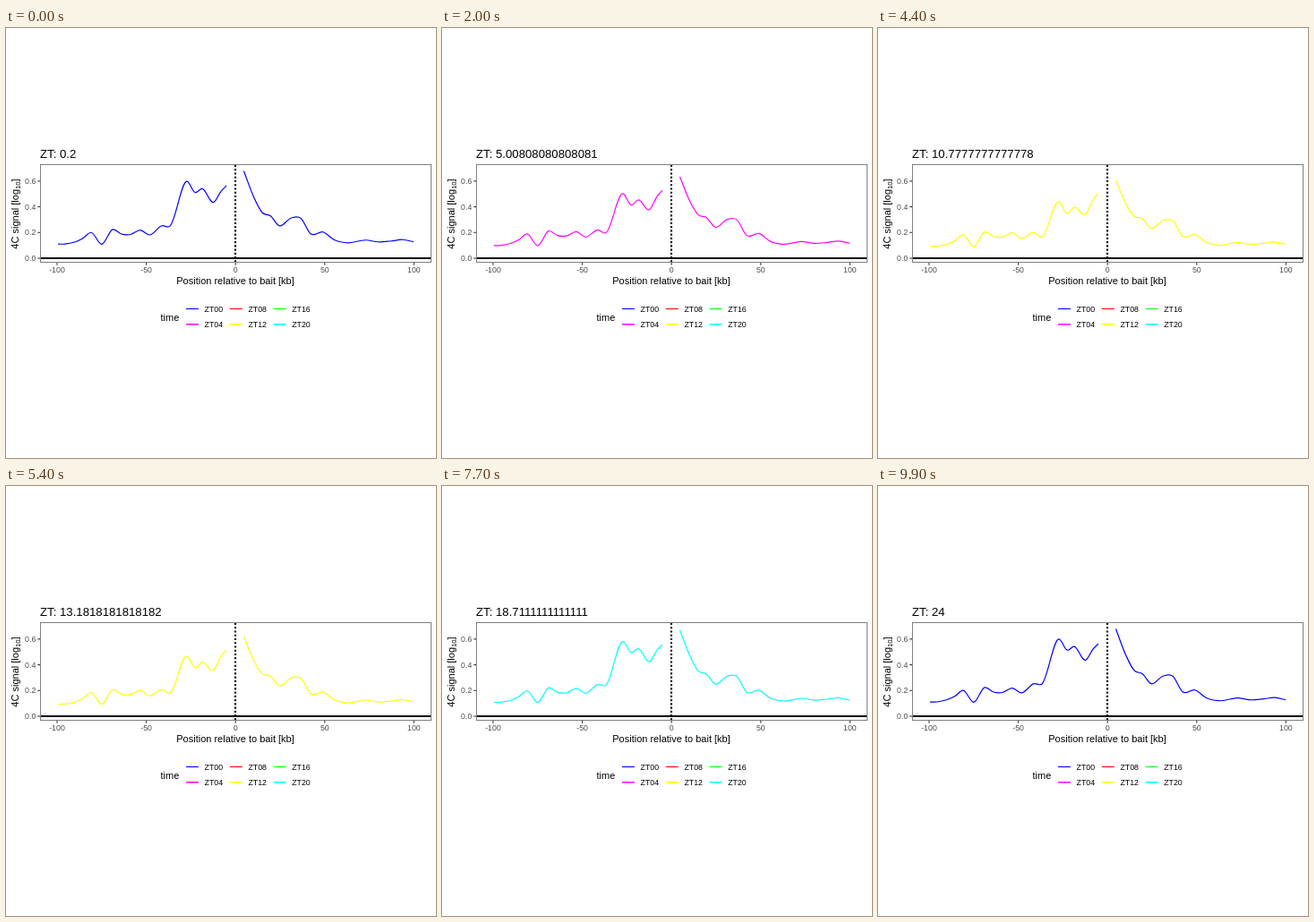
An HTML page that plays this animation: 480x480 px, repeating every 10 s.

```html
<!DOCTYPE html>
<html lang="en">
<head>
<meta charset="utf-8">
<title>4C signal over time</title>
<style>
html, body { margin: 0; width: 100%; height: 100%; overflow: hidden; background: #fff; }
svg { display: block; width: 100vw; height: 100vh; font: 11px "Liberation Sans", Arial, sans-serif; }
.small { font-size: 8.8px; }
.tick { fill: #4d4d4d; }
</style>
</head>
<body>
<svg id="chart" viewBox="0 0 480 480">
  <text id="title" x="38" y="145" font-size="13.2"></text>
  <path id="curve" fill="none" stroke-width="1.2" stroke-linejoin="round"/>
  <path d="M38 257H474.5" stroke="#000" stroke-width="2.13"/>
  <path d="M256 261.5V153" stroke="#000" stroke-width="2.13" stroke-dasharray="2.13"/>
  <rect x="38.5" y="152.5" width="436" height="109" fill="none" stroke="#7f7f7f"/>
  <text x="256" y="286" text-anchor="middle">Position relative to bait [kb]</text>
  <text transform="translate(14 207.5) rotate(-90)" text-anchor="middle">4C signal [log<tspan font-size="7.7" dy="2">10</tspan><tspan dy="-2">]</tspan></text>
  <text x="172.5" y="327">time</text>
</svg>
<script>
const chart = document.getElementById('chart');
const title = document.getElementById('title');
const curve = document.getElementById('curve');

function add(tag, attrs, text = '') {
  const el = document.createElementNS('http://www.w3.org/2000/svg', tag);
  for (const name in attrs) el.setAttribute(name, attrs[name]);
  el.textContent = text;
  chart.append(el);
}

// Axes
for (let i = 0; i < 5; i++) {
  const x = 57 + i * 99.6;
  add('path', { d: `M${x} 262V264.7`, stroke: '#333', 'stroke-width': 1.07 });
  add('text', { x, y: 273, class: 'small tick', 'text-anchor': 'middle' }, i * 50 - 100);
}
for (let i = 0; i < 4; i++) {
  const y = 257 - i * 28.7;
  add('path', { d: `M35.3 ${y}H38`, stroke: '#333', 'stroke-width': 1.07 });
  add('text', { x: 33.3, y: y + 3.1, class: 'small tick', 'text-anchor': 'end' }, (i * 0.2).toFixed(1));
}

// Legend, filled column by column
const colors = ['#00f', '#f0f', '#f00', '#ff0', '#0f0', '#0ff'];
colors.forEach((stroke, i) => {
  const x = 201 + (i >> 1) * 48.8, row = i % 2, y = 313.5 + row * 17.3;
  add('path', { d: `M${x} ${y}h14`, stroke, 'stroke-width': 1.1 + row * 0.4 });
  add('text', { x: x + 20.6, y: y + 3.4, class: 'small' }, 'ZT' + String(i * 4).padStart(2, '0'));
});

// Daily mean of the signal: its peaks and troughs on each side of the bait
const left = [
  [58, 242.5], [66, 242.3], [86, 235.9], [95, 229.5], [107, 242.6], [119, 226.2],
  [129, 231.3], [139, 231.8], [150, 227], [160, 232.8], [174, 224.3], [183, 226.8],
  [202, 181.7], [211, 194.3], [219, 189], [232, 200.5], [240, 186.7], [246, 180]
];
const right = [
  [265.5, 164.5], [277, 193], [286, 208], [295, 211], [305, 222], [318, 213.5],
  [329, 213.5], [340, 231], [354, 229], [366, 237.5], [380, 241], [402, 238],
  [415, 240], [430, 239], [443, 237.5], [455, 240]
];

const bell = (x, center, width) => Math.exp(-(((x - center) / width) ** 2) / 2);

// The signal swings once a day, highest at ZT 22, most strongly near the bait
function atTime(points, t) {
  const phase = Math.cos((t - 22) * Math.PI / 12);
  return points.map(([x, y]) => [x, y - phase * (1.5 + 11.5 * bell(x, 208, 20) + 4 * bell(x, 265, 12))]);
}

// Smooth path through the points
function smooth(points) {
  const gap = i => points[i + 1][0] - points[i][0];
  const rise = i => (points[i + 1][1] - points[i][1]) / gap(i);
  const end = points.length - 1;
  const slope = i => {
    if (i === 0) return rise(0);
    if (i === end) return rise(end - 1);
    return (rise(i - 1) * gap(i) + rise(i) * gap(i - 1)) / (gap(i - 1) + gap(i));
  };
  let d = 'M' + points[0];
  for (let i = 0; i < end; i++) {
    const [x, y] = points[i], [nx, ny] = points[i + 1], h = gap(i) / 3;
    d += `C${x + h} ${y + h * slope(i)} ${nx - h} ${ny - h * slope(i + 1)} ${nx} ${ny}`;
  }
  return d;
}

const start = performance.now();
function draw() {
  const step = Math.floor((performance.now() - start) / 100) % 100;
  const t = 0.2 + step * 23.8 / 99;
  title.textContent = 'ZT: ' + Number(t.toPrecision(15));
  curve.setAttribute('stroke', colors[Math.round(t / 4) % 6]);
  curve.setAttribute('d', smooth(atTime(left, t)) + smooth(atTime(right, t)));
  requestAnimationFrame(draw);
}
draw();
</script>
</body>
</html>
```
